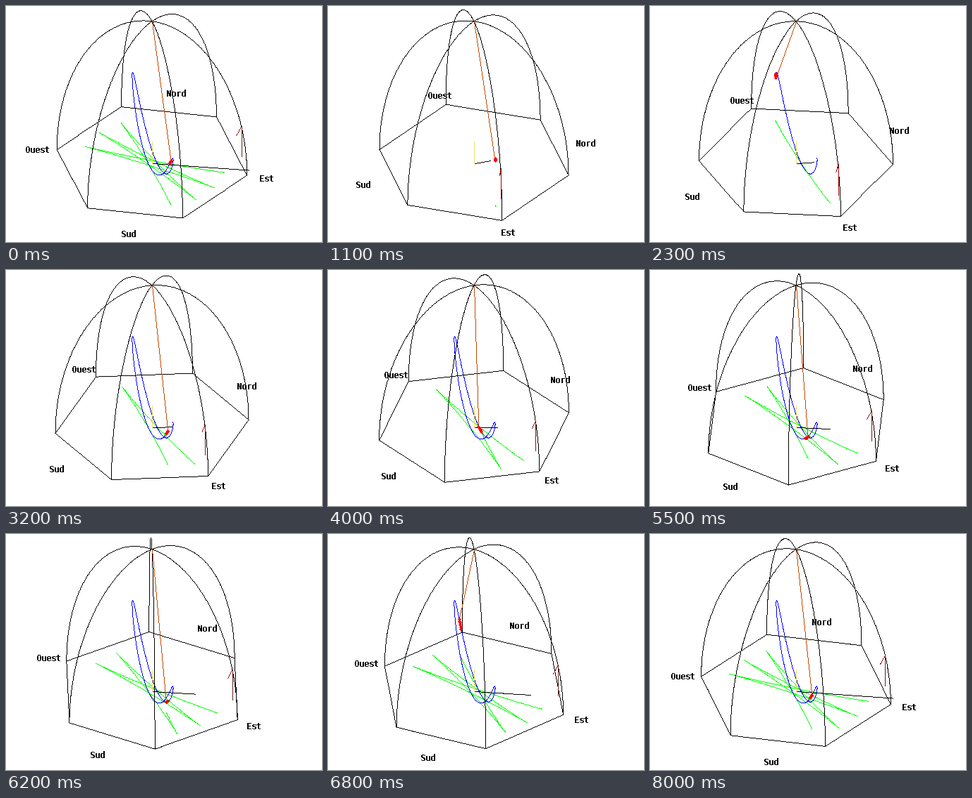
A matplotlib script that plays this animation: 448 px wide and 336 px high, repeating every 8100 ms.

```python
import numpy as np
import matplotlib.pyplot as plt
from matplotlib.animation import FuncAnimation

plt.rcParams.update({"text.hinting": "native", "text.hinting_factor": 1})

W, H, DPI = 448, 336, 100
STEPS = 81

RX, RY, DOME = 137.6, 84.9, 201.8     # floor half-axes and dome height on screen
HUB = 207.5 + 223.8j                  # centre of the swing
HUT = 206.5 + 222.3j                  # centre of the hexagon
SPIN = np.radians(0.879)              # hut rotation per step
RELEASE, PERIOD, SWING = 10, 24, 0.752
OMEGA = 2 * np.pi / PERIOD
DRIFT = SWING * SPIN / OMEGA          # minor axis caused by the release speed

BLACK, BLUE, GREEN, RED = (0, 0, 0), (0, 0, 255), (0, 255, 0), (255, 0, 0)
ROPE, HOOK, UPRIGHT = (192, 74, 0), (144, 16, 16), (240, 224, 96)


def east(step):
    return np.radians(82.8) - SPIN * np.asarray(step, float)


def project(p, lift=0.0, origin=HUB):
    """Floor position (complex) and lift in pixels to screen x, y."""
    return origin.real + RX * np.real(p), origin.imag + RY * np.imag(p) - lift


def swing(step):
    step = np.asarray(step, float)
    phase = OMEGA * (step - RELEASE)
    free = np.exp(1j * east(RELEASE)) * (
        SWING * np.cos(phase) - 1j * DRIFT * np.sin(phase))
    return np.where(step < RELEASE, SWING * np.exp(1j * east(step)), free)


def bob(step):
    p = swing(step)
    return project(p, DOME * (1 - np.sqrt(1 - np.abs(p) ** 2)))


fig = plt.figure(figsize=(W / DPI, H / DPI), dpi=DPI, facecolor="white")
ax = fig.add_axes([0, 0, 1, 1])
canvas = np.full((H, W, 3), 255, np.uint8)
picture = ax.imshow(canvas, interpolation="nearest", aspect="auto")
ax.axis("off")
labels = [ax.text(0, 0, name, family="DejaVu Sans Mono", weight="bold",
                  size=11.63 * 72 / DPI, antialiased=False)
          for name in ("Est", "Sud", "Ouest", "Nord")]


def stroke(x, y, color):
    """Draw a polyline one pixel wide, without smoothing."""
    for x0, y0, x1, y1 in zip(x[:-1], y[:-1], x[1:], y[1:]):
        count = int(max(abs(x1 - x0), abs(y1 - y0))) + 2
        col = np.rint(np.linspace(x0, x1, count)).astype(int)
        row = np.rint(np.linspace(y0, y1, count)).astype(int)
        canvas[row, col] = color


def draw_ball(step):
    for x, y in zip(*bob(np.linspace(step - 0.5, step, 6))):
        x, y = int(round(x)), int(round(y))
        for d, half in zip(range(-2, 3), (0, 1, 2, 1, 0)):
            canvas[y + d, x - half:x + half + 1] = RED


ARC = np.linspace(0, np.pi, 90)
AXIS_T = [11, 23, 40, 55, 68, 80]
AXIS_X = [22, 23.5, 32, 47, 79, 136]
AXIS_Y = [-4, -1.7, 0, 2, 5, 9.5]


def draw_hut(angle):
    k = np.arange(7)
    x, y = project(np.exp(1j * (angle + k * np.pi / 3)), origin=HUT)
    y = y + 1.4 * (-1.0) ** k
    y[6] = y[0]
    stroke(x, y, BLACK)
    for i in range(3):
        stroke(HUT.real + (x[i] - HUT.real) * np.cos(ARC),
               HUT.imag + (y[i] - HUT.imag) * np.cos(ARC) - 201 * np.sin(ARC),
               BLACK)
    for i, label in enumerate(labels):
        lx, ly = project(1.2 * np.exp(1j * (angle + i * np.pi / 2)),
                         origin=206.3 + 223.7j)
        label.set_position((round(lx - 3.5 * len(label.get_text())),
                            round(ly + 4.5)))


def draw_post(step, angle):
    out = np.exp(1j * angle)
    x, top = project(0.935 * out, 68.8)
    fade = np.clip((step - RELEASE) / 71, 0, 1)
    stroke([x, x], [top, top + 43.5],
           (168 - 86 * fade, 40 * fade, 40 * fade))
    end = bob(step) if step < RELEASE else project(0.88 * out, 54.5)
    stroke([x, end[0]], [top, end[1]], HOOK)


def draw_trails(step, angle):
    times = np.arange(RELEASE, step + 0.01, 0.2)
    stroke(*project(swing(times) * np.exp(1j * (angle - east(times)))), GREEN)
    stroke(*bob(times[times <= RELEASE + PERIOD + 0.1]), BLUE)


def draw_axes(step):
    stroke([207, 207], [193, 223], UPRIGHT)
    reach = 1 / np.interp(step, AXIS_T, 1 / np.array(AXIS_X))
    stroke([208, 208 + reach],
           [224, 224 + np.interp(step, AXIS_T, AXIS_Y)], BLACK)


def update(frame):
    step = frame or STEPS
    angle = east(step)
    canvas[:] = 255
    draw_trails(step, angle)
    draw_axes(step)
    draw_hut(angle)
    draw_post(step, angle)
    x, y = bob(step)
    stroke([207, x], [22, y], ROPE)
    draw_ball(step)
    picture.set_data(canvas)
    return []


anim = FuncAnimation(fig, update, frames=STEPS, interval=100,
                     repeat=True, repeat_delay=0, blit=False)
plt.show()
```
